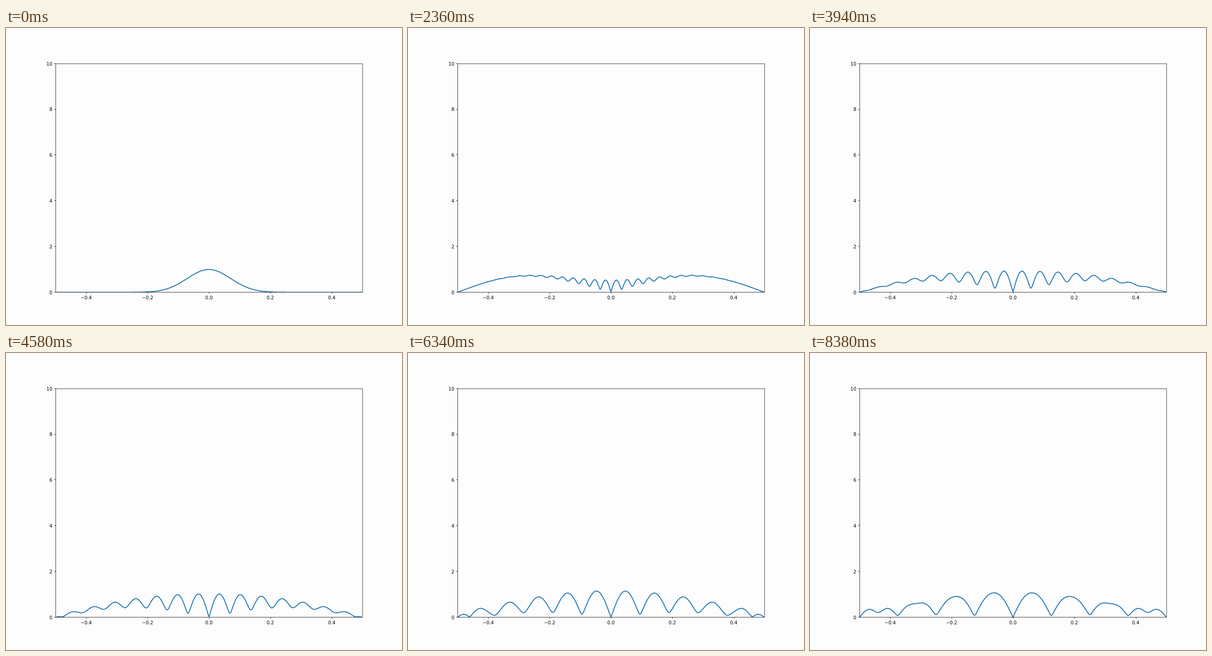
Recreate the animation shown at these times as an HTML page with a canvas. Size 864 by 648 pixels, loop 8400 ms.

```html
<!DOCTYPE html>
<html lang="en">
<head>
<meta charset="utf-8">
<title>Wave packet</title>
<style>
  html, body { margin: 0; width: 864px; height: 648px; overflow: hidden; background: #fdfdfd; }
  canvas { display: block; }
</style>
</head>
<body>
<canvas id="stage" width="864" height="648"></canvas>
<script>
const ctx = document.getElementById('stage').getContext('2d');
const STEP = 20, FRAMES = 420;
const POINTS = 500;
const box = { left: 108, right: 777.6, top: 77.76, bottom: 576.72 };
const AREA = 0.512;        // kept constant after the first frame
const TAKEOVER = 24;       // frame where the wall modes overtake the packet

const px = x => box.left + (x + 0.5) * (box.right - box.left);
const py = y => box.bottom - y / 10 * (box.bottom - box.top);
const snapX = x => Math.round(x) + 0.5;
const snapY = y => 648 - Math.round(648 - y) - 0.5;

// Free Gaussian packet: exp(-100 x^2 / (1 + iq)) / sqrt(1 + iq)
function packet(x, n) {
  const q = 0.00952 * n, s = 1 + q * q;
  const size = Math.exp(-100 * x * x / s) / Math.pow(s, 0.25);
  const phase = 100 * x * x * q / s - Math.atan(q) / 2;
  return [size * Math.cos(phase), size * Math.sin(phase)];
}

// Chirped dipoles at both walls, with their mirror images
function wallWave(x, n) {
  const m = Math.max(n - 1, 0.5);
  const spread = 4.74e-4 * m, chirp = Math.PI / (3.0e-4 * m);
  let re = 0, im = 0;
  for (let k = -3; k <= 2; k++) {
    const u = x - 0.5 - k;
    const size = 1.65 * u / Math.sqrt(spread) * Math.exp(-u * u / (2 * spread));
    re += size * Math.cos(chirp * u * u);
    im += size * Math.sin(chirp * u * u);
  }
  return [re, im];
}

function profile(n) {
  const values = [];
  const weight = n ? Math.exp(-1.2 * (n - TAKEOVER)) : 1;
  let sum = 0;
  for (let j = 0; j < POINTS; j++) {
    const x = j / (POINTS - 1) - 0.5;
    const [gr, gi] = packet(x, n);
    const [wr, wi] = n ? wallWave(x, n) : [0, 0];
    const sign = j % 2 ? -1 : 1;
    const v = Math.hypot(weight * gr + sign * wr, weight * gi + sign * wi);
    values.push(v);
    sum += v;
  }
  const scale = n ? AREA * (POINTS - 1) / sum : 1;
  return values.map(v => v * scale);
}

function drawCurve(values) {
  ctx.save();
  ctx.beginPath();
  ctx.rect(box.left, box.top, box.right - box.left, box.bottom - box.top + 0.3);
  ctx.clip();
  ctx.beginPath();
  values.forEach((v, j) => ctx.lineTo(px(j / (POINTS - 1) - 0.5), py(v)));
  ctx.strokeStyle = '#1f77b4';
  ctx.lineWidth = 2;
  ctx.lineJoin = 'round';
  ctx.stroke();
  ctx.restore();
}

function drawAxes() {
  const l = snapX(box.left), r = snapX(box.right) - 0.5;
  const t = snapY(box.top) + 0.5, b = snapY(box.bottom);
  ctx.strokeStyle = ctx.fillStyle = '#000';
  ctx.lineWidth = 0.8;
  ctx.strokeRect(l, t, r - l, b - t);
  ctx.font = '10px "DejaVu Sans", sans-serif';
  ctx.beginPath();
  ctx.textAlign = 'center';
  for (let k = -2; k <= 2; k++) {
    const x = k / 5, tx = snapX(px(x));
    ctx.moveTo(tx, b);
    ctx.lineTo(tx, b + 3.5);
    ctx.fillText(x.toFixed(1).replace('-', '\u2212'), px(x), 592);
  }
  ctx.textAlign = 'right';
  for (let y = 0; y <= 10; y += 2) {
    const ty = snapY(py(y));
    ctx.moveTo(l, ty);
    ctx.lineTo(l - 3.5, ty);
    ctx.fillText(y, 101, py(y) + 3.8);
  }
  ctx.stroke();
}

function draw(n) {
  ctx.fillStyle = '#fdfdfd';
  ctx.fillRect(0, 0, 864, 648);
  drawCurve(profile(n));
  drawAxes();
}

const start = performance.now();
let shown = 0;
function tick() {
  const n = Math.floor((performance.now() - start) / STEP) % FRAMES;
  if (n !== shown) draw(shown = n);
  requestAnimationFrame(tick);
}
draw(0);
requestAnimationFrame(tick);
</script>
</body>
</html>
```
